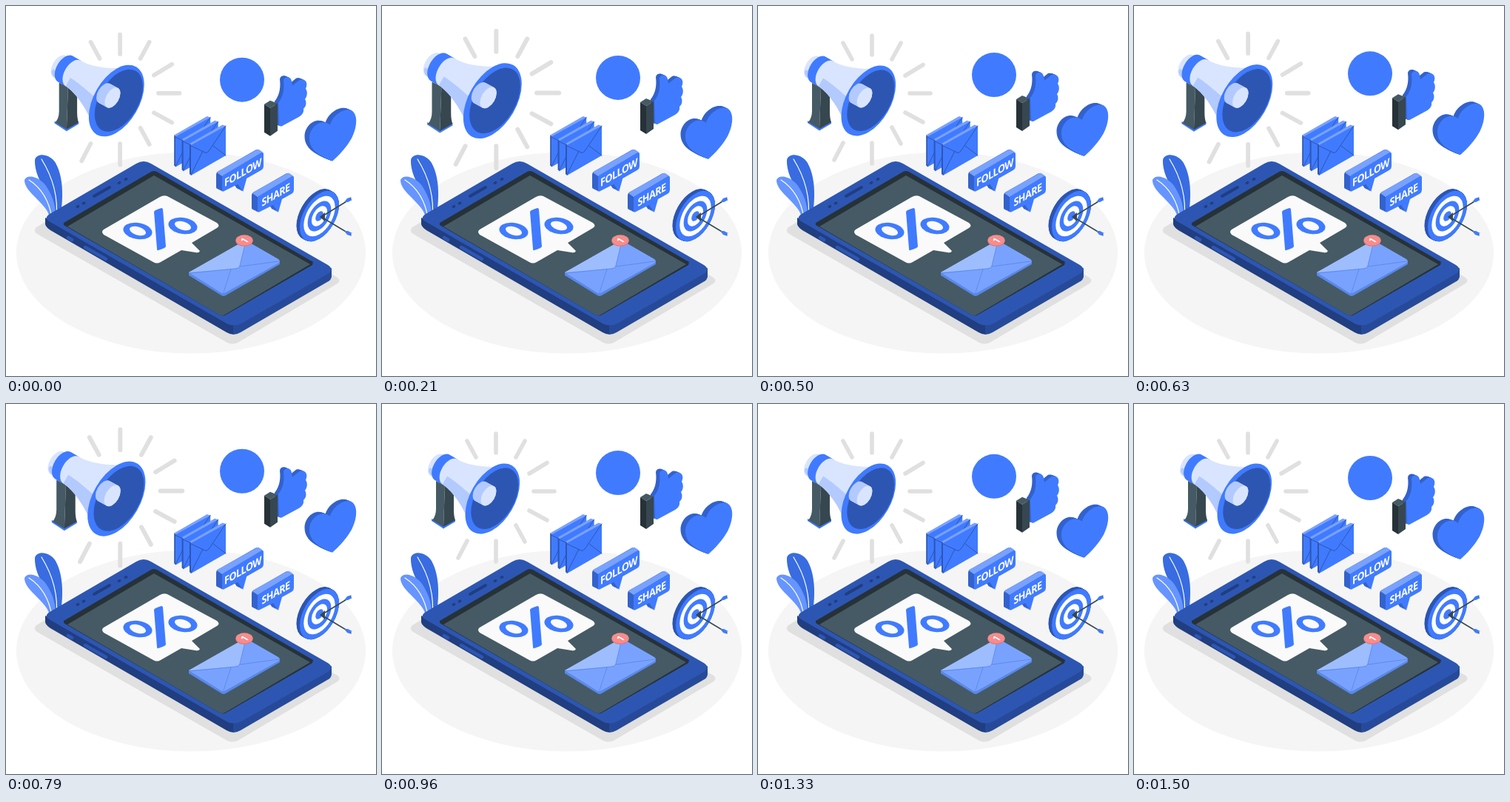
An HTML page with a canvas that plays this animation: 500 by 500 pixels, repeating every 1540 ms.

```html
<!DOCTYPE html>
<html lang="en">
<head>
<meta charset="utf-8">
<title>Mobile marketing</title>
<style>
  html, body { margin: 0; width: 100%; height: 100%; overflow: hidden; background: #fff; }
  canvas { display: block; width: 100vw; height: 100vh; }
</style>
</head>
<body>
<canvas id="stage"></canvas>
<script>
const SIZE = 500, LOOP = 1540, CYCLE = 1520, LEAD = 25;
const BLUE = '#407BFF', MID = '#3362CC', DEEP = '#2D56B3', NAVY = '#203E80';
const SKY = '#79A2FF', MIST = '#B3CAFF', PALE = '#D9E5FF';
const SLATE = '#455A64', COAL = '#37474F', INK = '#263238', GREY = '#E0E0E0', CARD = '#FAFAFA';

const canvas = document.getElementById('stage');
const ctx = canvas.getContext('2d');
const dpr = window.devicePixelRatio || 1;
canvas.width = canvas.height = SIZE * dpr;

function fill(path, color) {
  ctx.fillStyle = color;
  ctx.fill(new Path2D(path));
}

function line(path, color, width = 1) {
  ctx.strokeStyle = color;
  ctx.lineWidth = width;
  ctx.lineCap = ctx.lineJoin = 'round';
  ctx.stroke(new Path2D(path));
}

function oval(x, y, rx, ry, color, angle = 0) {
  ctx.fillStyle = color;
  ctx.beginPath();
  ctx.ellipse(x, y, rx, ry, angle * Math.PI / 180, 0, Math.PI * 2);
  ctx.fill();
}

function at(x, y, draw) {
  ctx.save();
  ctx.translate(x, y);
  draw();
  ctx.restore();
}

function iso(x, y, matrix, draw) {
  at(x, y, () => {
    ctx.transform(...matrix, 0, 0);
    draw();
  });
}
const WALL = [.866, -.5, 0, 1];
const FLOOR = [.866, -.5, .866, .5];

// Upright circle seen isometrically.
const disc = (x, y, r, color) => iso(x, y, WALL, () => oval(0, 0, r, r, color));

function tube(x, y, dx, dy, r, color) {
  for (let i = 0; i <= 16; i++) disc(x + dx * i / 16, y + dy * i / 16, r, color);
}

function label(text, size) {
  ctx.font = `bold ${size}px "Open Sans", sans-serif`;
  ctx.letterSpacing = '-0.6px';
  ctx.textAlign = 'center';
  ctx.textBaseline = 'alphabetic';
  ctx.fillStyle = '#fff';
  ctx.fillText(text, 0, size * .357);
}

// Solid with depth running back to the upper left.
function extrude(path, dx, dy, side, front) {
  for (let i = 6; i > 0; i--) at(dx * i / 6, dy * i / 6, () => fill(path, side));
  fill(path, front);
}

function drawLeaves() {
  fill('M65 288C66 258 38 238 39 208C41 198 59 199 67 212C79 234 77 263 73 290Z', '#386CE0');
  line('M48 207C63 231 71 257 68 288', '#fff', 1.2);
  fill('M59 287C58 268 24 252 25 235C30 225 49 233 56 246C64 259 68 273 67 289Z', '#6695FF');
  line('M31 235C48 246 58 262 62 286', '#fff', 1.2);
}

function drawPhone() {
  fill('M56 290L41 299Q36 304 42 308L299 455Q306 458 313 455L448 375Q453 371 448 367L436 360Z', GREY);
  drawLeaves();
  fill('M53 286L53 295Q54 299 60 303L298 441Q303 444 308 444L308 425Z', NAVY);
  fill('M440 354L440 365Q440 370 434 373L317 441Q312 444 307 444L307 425Z', '#264A99');
  fill('M59 281L176 213Q186 207 196 213L435 350Q444 356 435 362L318 429Q308 434 298 429L60 292Q50 287 59 281Z', DEEP);
  line('M84 313L89 316M107 326L135 342', DEEP, 4.5);
  line('M119 257L140 245', NAVY, 4);
  for (const [x, y] of [[97, 271], [105, 266.5], [153, 239], [162, 234]]) oval(x, y, 2.6, 1.8, NAVY, -25);

  fill('M78 293L196 224Q200 222 204 224L415 346L414 350L296 418Q292 419 288 417L78 296Z', INK);
  fill('M83 298L200 229L411 349L296 417Q292 419 288 417Z', SLATE);
}

function drawOffer() {
  fill('M132 302L208 258Q213 255 218 257L285 293Q290 297 285 300L251 320L262 331Q261 334 256 333L237 330L209 346Q204 349 199 346L132 309Q128 305 132 302Z', CARD);
  for (const [x, y] of [[178, 304], [239, 297]]) iso(x, y, FLOOR, () => {
    oval(0, 0, 14.4, 17.4, BLUE);
    oval(0, 0, 7, 10.6, CARD);
  });
  fill('M200 278Q200 276 210 273Q212 273 212 275L216 325Q216 327 206 330Q204 331 204 328Z', BLUE);
}

function drawMail() {
  fill('M247 360L247 364L291 391Q294 393 297 391L370 349V344Z', '#5A88E8');
  fill('M247 360L320 319Q324 317 328 319L368 342Q372 345 367 348L297 387Q294 389 290 387Z', SKY);
  line('M316 352L369 345M304 356L294 387', '#5A88E8', .9);
  fill('M247 360L319 319Q324 316 323 323L316 351Q315 355 310 355Z', '#9EBDFF');
  line('M248 361L310 355Q315 355 316 351L323 322', '#5A88E8', .9);
  oval(322, 317.5, 11.5, 7.3, '#E57373');
  oval(322, 316.5, 11.5, 7.2, '#F78C8C');
  iso(322, 317, FLOOR, () => label('1', 13));
}

function drawEnvelopes() {
  for (const shift of [2, 1, 0]) at(-10.4 * shift, -5.8 * shift, () => {
    fill('M248 186L292.5 160.5L297 162V165L251 190Z', SKY);
    fill('M248 186L250.5 188V229L248 227Z', DEEP);
    fill('M250 188L297 162V202L250 229Z', BLUE);
    line('M250 228L266 196M297 202L280 189M250 189L269 198Q272 199 274 196L297 162', DEEP, 1);
  });
}

function drawTag(x, y, width, text, textX) {
  const rise = width * .575, tail = 15 + width * .04;
  const front = `M2 -1L${width - 3} ${2 - rise}Q${width} ${-rise} ${width} ${3 - rise}` +
    `V${20 - rise}Q${width} ${23 - rise} ${width - 3} ${25 - rise}` +
    `L${tail + 16} ${23 - (tail + 16) * .575}L${tail + 11} 22L${tail + 4} ${24 - (tail + 4) * .575}` +
    `L3 21Q0 23 0 20V3Q0 0 2 -1Z`;
  at(x, y, () => {
    extrude(front, -8, -4, MID, BLUE);
    fill(`M-7 -4Q-7 -5 -5 -6L${width - 10} ${-rise - 2}Q${width - 7} ${-rise - 4} ${width - 5} ${-rise - 2}` +
      `L${width - 1} ${.5 - rise}L2 -.5L0 1Z`, SKY);
    iso(textX, 12 - textX * .575, WALL, () => label(text, 14.6));
  });
}

function drawTarget() {
  tube(419, 281.5, 4.5, 2.5, 30.6, DEEP);
  for (let i = 0; i < 5; i++) disc(423.5, 284, 30.6 * (1 - i / 5), i % 2 ? '#fff' : BLUE);
  line('M426 285L466 260.5M426 285L466 309', COAL, 1.5);
  fill('M424 285L431 279V291Z', COAL);
  fill('M457 265L461 260L467 258L465 261L468 262L462 265Z', BLUE);
  fill('M457 304L461 309L467 311L465 308L468 307L462 304Z', BLUE);
}

// Strip of the horn between two fractions of its half width.
function drawFlare(from, to, color) {
  const steps = 30;
  const point = (i, side) => {
    const t = i / steps, reach = side * 1.2247 * (16 + 26.5 * t ** 1.7);
    return [91.5 + 57.8 * t - reach * .5, 91.5 + 36.5 * t + reach * .866];
  };
  ctx.fillStyle = color;
  ctx.beginPath();
  for (let i = 0; i <= steps; i++) ctx.lineTo(...point(i, from));
  for (let i = steps; i >= 0; i--) ctx.lineTo(...point(i, to));
  ctx.fill();
}

function drawMegaphone() {
  line('M154 40V66M154 185V213M205 118H233M181 72L193 50M199 94L223 79.5M199 144L223 157' +
    'M181 164L193 186M127 72L115 50M115 185L103 208', GREY, 5.6);

  fill('M67 155L83 164L99 156V159L83 168.5L67 158Z', BLUE);
  fill('M73 104L85 110L83 166L68 157Q73 151 73 142Z', SLATE);
  fill('M85 109L97 112V143Q97 152 99 157L83 166Z', COAL);

  tube(73.7, 82.5, 8, 4, 13.5, PALE);
  fill('M63.5 92Q65 97 70 98L74 92L65 86Q62 88 63.5 92Z', MIST);
  tube(81, 85.5, 10.5, 6, 16, BLUE);
  disc(91.5, 91.5, 16, PALE);
  drawFlare(-1, 1, PALE);
  drawFlare(.35, 1, MIST);

  disc(149.3, 128, 42.5, BLUE);
  disc(152.3, 127.7, 37, DEEP);
  tube(133, 118, 11, 6, 12, MIST);
  disc(144, 124, 12, PALE);
}

function drawReactions() {
  oval(319, 100, 30, 30, BLUE);

  extrude('M369 162L368 131C372 126 377 117 375 101C376 95 385 95 386 102L387 108L397 100' +
    'C404 98 409 104 405 112C408 116 407 123 404 126C407 131 405 137 402 139C403 145 399 148 396 150L372 163Z',
    -5, -2, MID, BLUE);
  fill('M349 133L357 128L367 132L357 138Z', SLATE);
  fill('M349 133L357 138V176L349 171Z', INK);
  fill('M357 138L367 132V169L357 176Z', COAL);

  extrude('M441 210C428 204 410 197 410 179C410 164 426 151 438 161C441 149 455 138 466 141' +
    'C477 146 474 166 467 179C461 190 451 201 441 210Z', -6.5, -2.5, MID, BLUE);
}

// Two linear beats, then a rest.
function beat(phase) {
  const stops = [[0, 0], [.1, 1], [.3, 0], [.4, 0], [.5, 1], [.6, 0], [2, 0]];
  const i = stops.findIndex(([p]) => p > phase);
  const [p0, v0] = stops[i - 1], [p1, v1] = stops[i];
  return v0 + (v1 - v0) * (phase - p0) / (p1 - p0);
}

function render(time) {
  const phase = (time % LOOP + LEAD) / CYCLE;
  const lift = 10 * Math.max(0, 1 - Math.abs(2 * phase - 1));
  const scale = 1 + .1 * beat(phase);

  ctx.setTransform(dpr, 0, 0, dpr, 0, 0);
  ctx.fillStyle = '#fff';
  ctx.fillRect(0, 0, SIZE, SIZE);

  oval(250, 333.5, 236, 136, '#F5F5F5');
  drawPhone();
  drawOffer();
  drawMail();
  drawEnvelopes();
  drawTag(292, 229, 56, 'FOLLOW', 28);
  drawTag(340, 257, 49, 'SHARE', 24.5);
  drawTarget();
  at(149, 126, () => {
    ctx.scale(scale, scale);
    ctx.translate(-149, -126);
    drawMegaphone();
  });
  at(0, -lift, drawReactions);
}

function tick() {
  render(performance.now());
  requestAnimationFrame(tick);
}
tick();
</script>
</body>
</html>
```
